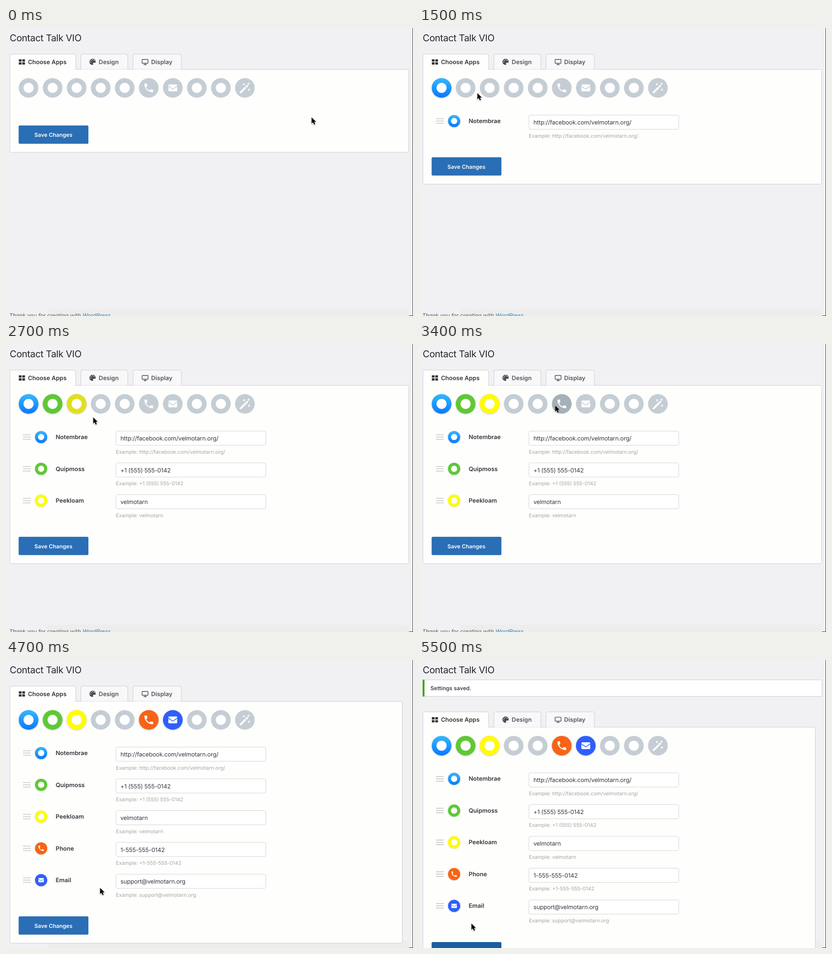
Recreate the animation shown at these times as an HTML page. Size 889 px wide and 630 px high, loop 6.4 s.

```html
<!DOCTYPE html>
<html lang="en">
<head>
<meta charset="utf-8">
<title>Chat settings</title>
<style>
  html, body { margin: 0; width: 100%; height: 100%; overflow: hidden; background: #f1f1f4; }
  svg { display: block; font-family: Inter, "Open Sans", sans-serif; text-rendering: geometricPrecision; }
  .bold { font-weight: 600; font-size: 13px; }
  .small { font-weight: 600; font-size: 12px; }
  .title { font-size: 20.6px; letter-spacing: -.4px; }
  .field { font-size: 12.95px; letter-spacing: -.15px; }
  .hint { font-size: 11.1px; }
  .footer { font-size: 12px; font-style: italic; }
</style>
</head>
<body>
<svg width="889" height="630" viewBox="0 0 889 630">
  <defs>
    <linearGradient id="sky" x2="0" y2="1"><stop stop-color="#35b8ff"/><stop offset="1" stop-color="#0a78ff"/></linearGradient>
    <filter id="soft" x="-20%" y="-20%" width="140%" height="150%"><feDropShadow dx="0" dy="1" stdDeviation="1.6" flood-opacity=".22"/></filter>
    <filter id="drop" x="-50%" y="-50%" width="200%" height="200%"><feDropShadow dx="0" dy="1.2" stdDeviation="1" flood-opacity=".35"/></filter>
  </defs>
  <g id="scene"></g>
</svg>
<script>
const LOOP = 6400, STEP = 100, ROW = 69.5, SAVED_AT = 5400, NOTICE_SHIFT = 56.4;
const PANEL = '#fefefc', BORDER = '#cbcdd1';
const BUTTON = { x: 27.6, y: 213.2, w: 152.4, h: 40 };
const scene = document.getElementById('scene');

const apps = [
  { on: 1200, color: 'url(#sky)', name: 'Notembrae', value: 'http://facebook.com/velmotarn.org/' },
  { on: 1900, color: '#5fc834', name: 'Quipmoss', value: '+1 (555) 555-0142' },
  { on: 2700, color: '#fffc00', name: 'Peekloam', value: 'velmotarn' },
  {},
  {},
  { on: 3600, color: '#f96414', name: 'Phone', value: '1-555-555-0142', example: '+1-555-555-0142', icon: 'phone' },
  { on: 4400, color: '#2f5ffb', name: 'Email', value: 'support@velmotarn.org', icon: 'mail' },
  {},
  {},
  { icon: 'wand' }
];

// Pointer path: time, x, y
const path = [
  [100, 667, 195], [200, 560, 198], [300, 150, 222], [400, 75, 208], [500, 57, 200], [800, 46, 149],
  [1100, 46, 149], [1200, 62, 156], [1300, 98, 160], [1500, 127, 142], [1800, 108, 138], [1900, 111, 138],
  [2500, 160, 140], [2600, 160, 140], [2700, 190, 160], [3000, 250, 150], [3300, 292, 136], [3400, 297, 134],
  [3500, 297, 134], [3800, 388, 133], [3900, 388, 133], [4200, 372, 134], [4300, 372, 134],
  [4400, 352, 185], [4700, 205, 498], [5000, 130, 570], [5200, 114, 576]
];

const glyphs = {
  phone: () => `<path transform="scale(1.06) translate(-12 -12)" fill="#fff" d="M6.6 10.8c1.4 2.8 3.8 5.1 6.6 6.6l2.2-2.2c.3-.3.7-.4 1-.2 1.1.4 2.3.6 3.6.6.6 0 1 .4 1 1V20c0 .6-.4 1-1 1C10.6 21 3 13.4 3 4c0-.6.4-1 1-1h3.5c.6 0 1 .4 1 1 0 1.2.2 2.4.6 3.6.1.3 0 .7-.2 1z"/>`,
  mail: c => `${rect(-9.7, -7.4, 19.4, 15, 2, '#fff')}<path d="M-10-4 -1.5 1.8Q0 2.8 1.5 1.8L10-4" fill="none" stroke="${c}" stroke-width="1.6"/>`,
  wand: c => `<g stroke="#fff" stroke-linecap="round" fill="none"><path d="M-9.5 10 5-4.5" stroke-width="4"/>
    <path d="M-2-10v4M-4-8h4M9 2v4M7 4h4M8-11v4M6-9h4" stroke-width="1.5"/></g>
    <path d="M.8-2.8 3.2-.4" stroke="${c}" stroke-width="1.2"/>`
};

const rect = (x, y, w, h, r, fill, stroke = 'none') =>
  `<rect x="${x}" y="${y}" width="${w}" height="${h}" rx="${r}" fill="${fill}" stroke="${stroke}"/>`;
const text = (x, y, kind, fill, content, anchor = 'start') =>
  `<text x="${x}" y="${y}" class="${kind}" fill="${fill}" text-anchor="${anchor}">${content}</text>`;
const mix = (a, b, k) => `rgb(${a.map((v, i) => Math.round(v + (b[i] - v) * k))})`;
const appX = i => 49.3 + 52.5 * i;
const rowCount = t => apps.filter(a => t >= a.on).length;

function pointerAt(t) {
  const next = path.findIndex(p => p[0] > t);
  if (next === 0) return path[0].slice(1);
  if (next < 0) return path[path.length - 1].slice(1);
  const [t0, x0, y0] = path[next - 1], [t1, x1, y1] = path[next];
  const k = (t - t0) / (t1 - t0);
  return [x0 + (x1 - x0) * k, y0 + (y1 - y0) * k];
}

// Hover strength, faded over two steps
const hover = (t, inside) => [t, t - STEP].filter(s => inside(...pointerAt(s), s)).length / 2;
const overApp = i => (x, y) => Math.hypot(x - appX(i), y - 131) < 21.5;
const overButton = (x, y, t) => {
  const top = BUTTON.y + ROW * rowCount(t);
  return x > BUTTON.x && x < BUTTON.x + BUTTON.w && y > top && y < top + BUTTON.h;
};

const glyph = (app, color) => app.icon ? glyphs[app.icon](color) : '<circle r="11" fill="#fff"/>';

function appButton(app, i, t) {
  const grey = mix([197, 205, 212], [165, 176, 184], hover(t, overApp(i)));
  const active = t >= app.on;
  const fading = active ? Math.max(0, 1 - (t - app.on) / 200) : 0;
  const tint = active ? `<circle r="21.5" fill="${app.color}" opacity="${1 - .14 * fading}"/>
    <circle r="21.5" opacity="${.08 * fading}"/>` : '';
  return `<g transform="translate(${appX(i)} 131)"><g ${active ? 'filter="url(#soft)"' : ''}>
    <circle r="21.5" fill="${grey}"/>${tint}</g>${glyph(app, active ? app.color : grey)}</g>`;
}

function row(app, i) {
  return `<g transform="translate(0 ${ROW * i})">
    <path d="M37 198.5h17M37 203.5h17M37 208.5h17" stroke="#c6c6c8" stroke-width="1.6"/>
    <g transform="translate(76.7 203.5) scale(.62)"><circle r="21.5" fill="${app.color}" filter="url(#soft)"/>${glyph(app, app.color)}</g>
    ${text(108.5, 208, 'bold', '#32373c', app.name)}
    ${rect(240, 190.5, 327.5, 31, 3.5, '#fff', '#d3d4d7')}
    ${text(250, 211, 'field', '#32373c', app.value)}
    ${text(240, 239.5, 'hint', '#a5a5a7', 'Example: ' + (app.example || app.value))}</g>`;
}

const tabIcons = [
  `<path fill="#32373c" d="M28 68.5h6v5h-6zM35.5 68.5h6v5h-6zM28 75h6v5h-6zM35.5 75h6v5h-6z"/>`,
  `<path fill="#444b52" d="M189 67.2a6.8 6.8 0 1 0 0 13.6c2 0 1.6-1.5 1.1-2.5-.5-1.1.2-2.2 1.5-2.2h2.2c1.3 0 2.1-.9 2.1-2.2 0-3.8-3-6.7-6.9-6.7z"/>
   <g fill="#f8f8f9"><circle cx="185" cy="74.5" r="1"/><circle cx="186" cy="71" r="1"/><circle cx="189.3" cy="69.3" r="1"/><circle cx="192.6" cy="71" r="1"/></g>`,
  `<path fill="none" stroke="#444b52" stroke-width="1.4" d="M298.3 68.7h11q1 0 1 1v6.6q0 1-1 1h-11q-1 0-1-1v-6.6q0-1 1-1zM304 77v3M300.5 80.2h6.6"/>`
];

function tab(x, right, textX, label, icon, active) {
  const bottom = active ? 91.5 : 90.5;
  return `<path d="M${x} ${bottom}V61q0-4 4-4H${right - 4}q4 0 4 4V${bottom}" fill="${active ? PANEL : '#f8f8f9'}" stroke="${BORDER}"/>
    ${icon}${text(textX, 78.6, 'bold', active ? '#32373c' : '#50575e', label)}`;
}

function settings(t) {
  const active = apps.filter(a => t >= a.on), n = active.length;
  const right = n === 5 ? 865.5 : 879.5;
  const blue = mix([42, 110, 181], [28, 94, 158], hover(t, overButton));
  return rect(8.5, 90.5, right - 8.5, 181.5 + ROW * n, 3, PANEL, BORDER)
    + tab(8.5, 152, 48, 'Choose Apps', tabIcons[0], true)
    + tab(163.5, 266, 202.5, 'Design', tabIcons[1])
    + tab(277.5, 383, 317, 'Display', tabIcons[2])
    + apps.map((a, i) => appButton(a, i, t)).join('')
    + active.map(row).join('')
    + `<g transform="translate(0 ${ROW * n})">${rect(BUTTON.x, BUTTON.y, BUTTON.w, BUTTON.h, 2.5, blue)}
       ${text(103.5, 238.3, 'small', '#fff', 'Save Changes', 'middle')}</g>`;
}

const notice = () => rect(8, 43.5, 872, 36, 0, '#fff', BORDER) + rect(8, 43, 4, 37, 0, '#3fa80c')
  + text(25, 66, 'small', '#3c434a', 'Settings saved.');

const footer = () => text(7, 633, 'footer', '#50575e',
  'Thank you for creating with <tspan fill="#2271b1" text-decoration="underline">WordPress</tspan>.');

function pointer(t) {
  const [x, y] = pointerAt(t);
  return `<path transform="translate(${x} ${y}) scale(1.05)" d="M.5.5V13.4L3.5 10.7 5.6 15.5 7.9 14.5 5.8 9.8H9.8Z"
    fill="#000" stroke="#fff" stroke-width="1" paint-order="stroke" filter="url(#drop)"/>`;
}

function draw(t) {
  const saved = t >= SAVED_AT;
  scene.innerHTML = rect(0, 0, 889, 630, 0, '#f1f1f4')
    + text(8, 28.8, 'title', '#23282d', 'Contact Talk VIO')
    + (rowCount(t) < 5 ? footer() : '')
    + rect(90, 614, 790, 16, 0, 'rgba(205,205,180,.12)')
    + `<g transform="translate(0 ${saved ? NOTICE_SHIFT : 0})">${settings(t)}</g>`
    + (saved ? notice() : '')
    + rect(888, 0, 1, 630, 0, '#3a3a3c') + rect(880, 629, 9, 1, 0, '#3a3a3c')
    + pointer(t);
}

let shown = -1;
function frame() {
  const t = Math.floor(performance.now() % LOOP / STEP) * STEP;
  if (t !== shown) draw(shown = t);
  requestAnimationFrame(frame);
}
frame();
</script>
</body>
</html>
```
